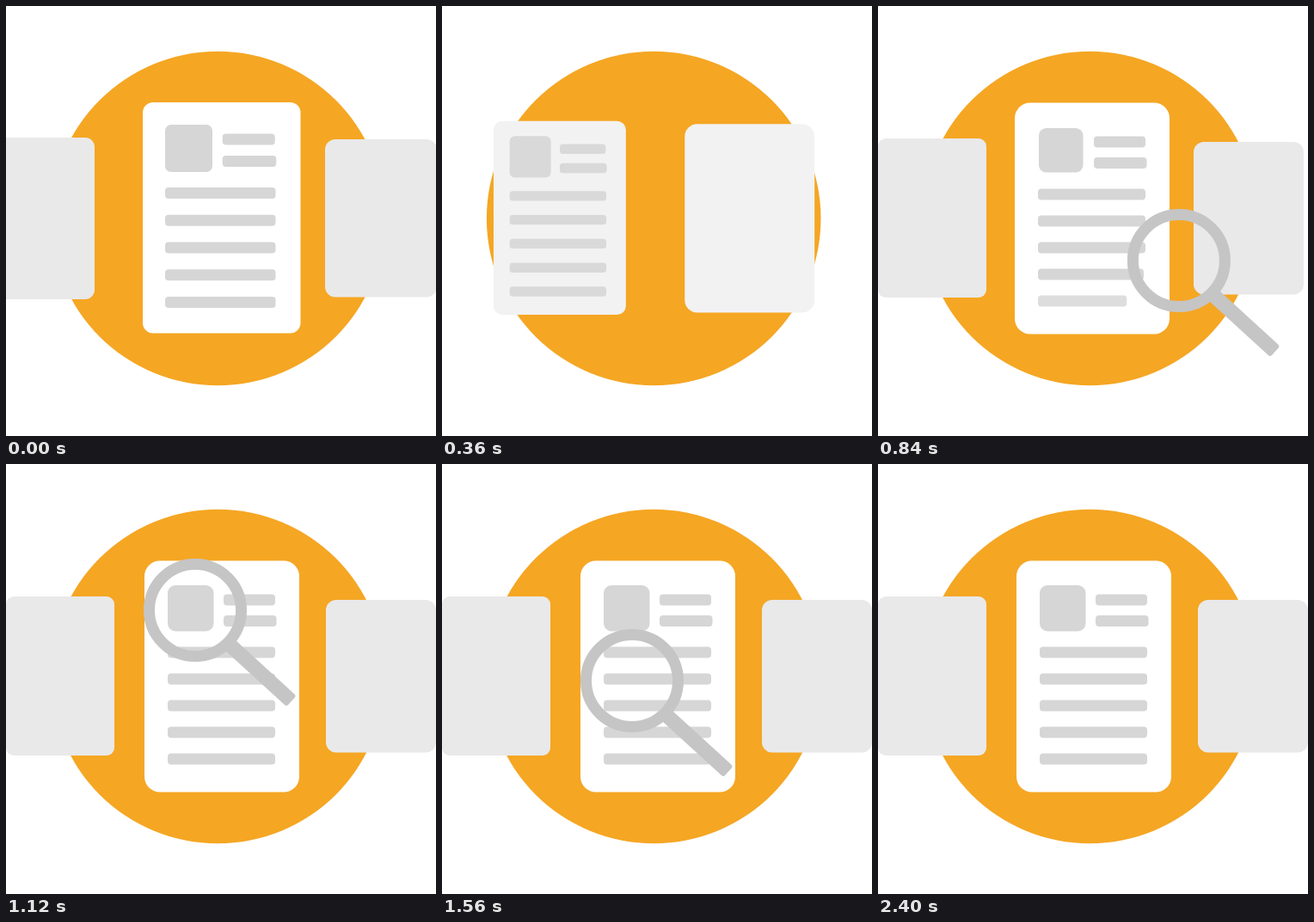
An HTML page with a canvas for the animation above (2.92 s loop, 500 by 500 pixels).

```html
<!DOCTYPE html>
<html lang="en">
<head>
<meta charset="utf-8">
<title>Document search</title>
<style>
  html, body { margin: 0; width: 100%; height: 100%; overflow: hidden; background: #fff; }
  canvas { display: block; width: 100vmin; height: 100vmin; }
</style>
</head>
<body>
<canvas id="stage" width="500" height="500"></canvas>
<script>
const ctx = document.getElementById('stage').getContext('2d');
const LOOP = 2920, STEP = 40;

const ramp = (t, from, to) => Math.min(1, Math.max(0, (t - from) / (to - from)));
const mix = (a, b, p) => a + (b - a) * p;
const mixAll = (a, b, p) => a.map((v, i) => mix(v, b[i], p));
const smooth = u => u * u * (3 - 2 * u);
const easeOut = u => 1 - (1 - u) ** 2;
const easeInOut = u => u < 0.5 ? 2 * u * u : 1 - 2 * (1 - u) ** 2;
const grey = v => `rgb(${v},${v},${v})`;

// Text layouts, measured from the middle of the content
const OLD_TEXT = { left: -64.25, square: 55, top: -106.5, radius: 7, short: 61, long: 128.5,
                   ys: [-96, -70.5], first: -33.5, gap: 31.75 };
const NEW_TEXT = { left: -62.5, square: 53.5, top: -103.5, radius: 9, short: 60, long: 125,
                   ys: [-93, -68.5], first: -32, gap: 31 };

// Page boxes: x, y, width, height, corner radius
const LEFT = [0, 154, 126, 185, 9];
const CENTER_START = [159, 112, 183.5, 268.5, 12];
const CENTER_END = [159, 112.5, 180, 269, 18];
const RIGHT_START = [371, 155, 130, 183.5, 12];
const RIGHT_END = [367, 158, 128, 177.5, 12];

// Reading path of the lens: time, x, y
const SCAN = [
  [1120, 220, 170], [1340, 284, 170], [1560, 221, 252], [1700, 284, 252],
  [1740, 284, 252], [2000, 224, 325], [2200, 298, 330], [2280, 298, 330]
];

function box(x, y, w, h, r, fill) {
  ctx.fillStyle = fill;
  ctx.beginPath();
  ctx.roundRect(x, y, w, h, r);
  ctx.fill();
}

function page([x, y, w, h, r], shade) {
  box(x, y, w, h, r, grey(shade));
}

function text(layout, x, y, scale, alpha, squareGrow = 1, lineGrow = () => 1) {
  const { left, square, top, radius, short, long, ys, first, gap } = layout;
  const ink = grey(214);
  ctx.save();
  ctx.translate(x, y);
  ctx.scale(scale, scale);

  const size = square * squareGrow, inset = (square - size) / 2;
  ctx.globalAlpha = alpha * Math.min(1, squareGrow * 1.05);
  box(left + inset, top + inset, size, size, radius * squareGrow, ink);

  for (let i = 0; i < 7; i++) {
    const grow = lineGrow(i);
    if (!grow) continue;
    const isShort = i < 2;
    const width = isShort ? short + i * 1.5 : long;
    ctx.globalAlpha = alpha * grow;
    box(isShort ? 2.5 : left, isShort ? ys[i] : first + (i - 2) * gap, width * grow, 13, 4, ink);
  }
  ctx.restore();
}

function oldPage(t) {
  const slide = smooth(ramp(t, 40, 600)), shrink = smooth(ramp(t, 110, 600));
  const rect = mixAll(CENTER_START, LEFT, shrink);
  rect[0] = mix(250.75, 63, slide) - rect[2] / 2;
  page(rect, mix(255, 233, slide));
  const alpha = 1 - smooth(ramp(t, 300, 560));
  text(OLD_TEXT, mix(249.25, 60.5, slide), 244.5, 1 - 0.243 * shrink, alpha);
}

function newPage(t, settle) {
  const p = smooth(ramp(t, 135, 640));
  const rect = mixAll(RIGHT_START, CENTER_END, p);
  rect[0] += 2 * settle;
  page(rect, mix(233, 255, p));
  if (t < 560) return;
  const middle = rect[0] + rect[2] / 2;
  text(NEW_TEXT, middle - 0.5, 244.5, 1, 1, easeOut(ramp(t, 560, 905)),
       i => easeOut(ramp(t, 560 + 35 * i, 680 + 35 * i)));
}

function lensPosition(t) {
  if (t < 1120) {
    const u = ramp(t, 663, 1120);
    return [mix(566, 220, easeOut(u)), mix(350, 170, easeInOut(u))];
  }
  if (t >= 2280) {
    const u = ramp(t, 2280, 2400) ** 1.4;
    return [mix(298, 575, u), mix(330, 565, u)];
  }
  const i = SCAN.findIndex(key => key[0] > t);
  const [t0, ...from] = SCAN[i - 1], [t1, ...to] = SCAN[i];
  return mixAll(from, to, smooth(ramp(t, t0, t1)));
}

function lens(t) {
  if (t < 663 || t >= 2400) return;
  ctx.save();
  ctx.translate(...lensPosition(t));
  ctx.strokeStyle = grey(197);
  ctx.lineWidth = 13;
  ctx.beginPath();
  ctx.arc(0, 0, 53.5, 0, 7);
  ctx.stroke();
  ctx.rotate(42.5 * Math.PI / 180);
  box(56, -6, 98, 17, 3, grey(197));
  ctx.restore();
}

function draw(t) {
  ctx.fillStyle = '#fff';
  ctx.fillRect(0, 0, 500, 500);
  ctx.fillStyle = '#f5a623';
  ctx.beginPath();
  ctx.arc(246.2, 247, 194.3, 0, 7);
  ctx.fill();

  const settle = smooth(ramp(t, 840, 960));
  page([-25 - 110 * ramp(t, 0, 300) ** 2, 153, 128, 188, 11], 233);
  oldPage(t);
  const incoming = [...RIGHT_END];
  incoming[0] = mix(505, 367, smooth(ramp(t, 400, 720))) + 5 * settle;
  page(incoming, 233);
  newPage(t, settle);
  lens(t);
}

function tick() {
  const t = performance.now() % LOOP;
  draw(Math.floor(t / STEP) * STEP);
  requestAnimationFrame(tick);
}
tick();
</script>
</body>
</html>
```
